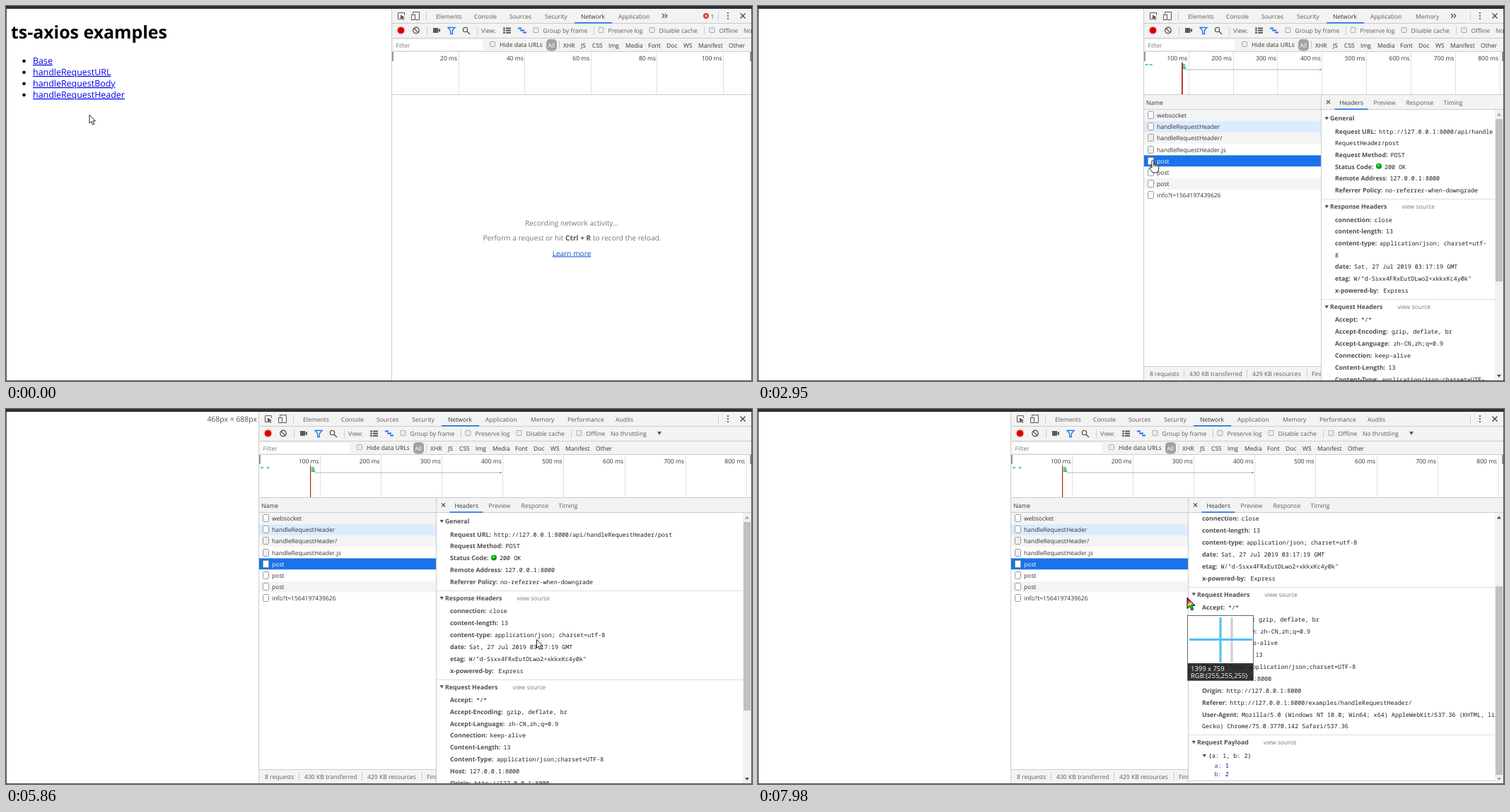
Animation of 1055x531 px, one loop 8 s. Source, as an HTML page:

```html
<!DOCTYPE html>
<html lang="en">
<head>
<meta charset="utf-8">
<title>Network panel demo</title>
<style>
  html, body { margin: 0; width: 100%; height: 100%; overflow: hidden; background: #fff; }
  svg { display: block; }
  #stage { width: 1055px; height: 531px; }
  text { font: 8.55px "Open Sans", "Noto Sans", sans-serif; fill: #333; text-rendering: geometricPrecision; white-space: pre; }
  .b { font-weight: 700; fill: #505050; font-size: 8.8px; }
  .m { font: 8.42px "Noto Sans Mono", "DejaVu Sans Mono", monospace; fill: #222; }
  .g { fill: #777; }
  .t { fill: #5a5a5a; }
  .u { text-decoration: underline; }
  .w { fill: #fff; }
  .e { text-anchor: end; }
  .c { text-anchor: middle; font-size: 10.15px; fill: #777; }
  .link { font-size: 12.45px; fill: #00e; text-decoration: underline; }
  .h1 { font-size: 24.9px; font-weight: 700; fill: #000; }
  .lens { font-size: 9.45px; fill: #fff; }
  .size { font-size: 10.46px; fill: #555; text-anchor: end; }
  .url { font-size: 9.3px; fill: #d0d0d0; }
</style>
</head>
<body>
<svg id="stage" viewBox="0 0 1055 531" xmlns="http://www.w3.org/2000/svg"></svg>
<script>
const LOOP = 8000;
const ROW = 16.1;
const stage = document.getElementById('stage');

// time, kind, x, y
const POINTER = [
  [0, 'arrow', 117.5, 153.5], [250, 'arrow', 119, 149], [380, 'arrow', 121, 142],
  [510, 'arrow', 123, 135], [640, 'hand', 125, 129], [760, 'hand', 126.5, 126],
  [1600, 'arrow', 190, 143], [1730, 'arrow', 362, 180], [1860, 'arrow', 510, 209],
  [2000, 'hand', 558.5, 218], [3350, 'hand', 568, 221], [3500, 'hand', 560, 226],
  [3650, 'hand', 549, 230], [4360, 'resize', 547, 234], [4890, 'resize', 500, 233],
  [5010, 'resize', 408, 232], [5160, 'resize', 359, 231], [5450, 'arrow', 400, 236],
  [5580, 'arrow', 510, 262], [5720, 'arrow', 655, 300], [5860, 'arrow', 750, 326],
  [6010, 'arrow', 776, 333], [7120, 'arrow', 768, 330], [7260, 'arrow', 738, 318],
  [7410, 'arrow', 700, 303], [7550, 'arrow', 664, 289], [7690, 'arrow', 638, 279],
  [7840, 'pick', 616, 271], [7980, 'pick', 607, 267]
];
const DOCK = [[0, 546], [4890, 500], [5010, 408], [5160, 358]];
const SCROLL = [[0, 0], [6150, 40], [6290, 78], [6430, 112], [6570, 131]];
const TIP = [[0, 0], [2150, .12], [2270, .3], [2390, .65], [2540, 1], [2820, 0]];

// label, left, right
const TABS = [['Elements', 62, 99], ['Console', 116, 149], ['Sources', 166, 198], ['Security', 216, 249],
  ['Network', 267, 302], ['Application', 320, 366], ['Memory', 384, 418], ['Performance', 436, 487], ['Audits', 504, 530]];
const TYPES = [['XHR', 242], ['JS', 267], ['CSS', 283], ['Img', 306], ['Media', 330], ['Font', 362],
  ['Doc', 388], ['WS', 412], ['Manifest', 433], ['Other', 476]];
const CHECKS = [['Group by frame', 200], ['Preserve log', 292], ['Disable cache', 364], ['Offline', 449]];

const PAGE = 'handleRequestHeader';
const REQS = [
  ['websocket', '101', 'webso...', 'sockjs.js:1683', '0 B'],
  [PAGE, '301', 'text/h...', 'Other', '299 B'],
  [PAGE + '/', '200', 'docu...', ':8000/exam...', '500 B'],
  [PAGE + '.js', '200', 'script', '(index)', '428 KB'],
  ['post', '200', 'xhr', 'xhr.ts:13', '219 B'],
  ['post', '200', 'xhr', 'xhr.ts:13', '219 B'],
  ['post', '200', 'xhr', 'xhr.ts:13', '250 B'],
  ['info?t=1564197439626', '200', 'xhr', 'sockjs.js:1605', '427 B']
];
const HOST = '127.0.0.1:8000';
const API = `http://${HOST}/api/${PAGE}/post`;

// label, value offset, value
const SECTIONS = [
  ['General', 0, [['Request URL', 81.5, API], ['Request Method', 98, 'POST'], ['Status Code', 89.5, '200 OK'],
    ['Remote Address', 97, HOST], ['Referrer Policy', 90.5, 'no-referrer-when-downgrade']]],
  ['Response Headers', 114, [['connection', 75, 'close'], ['content-length', 91.5, '13'],
    ['content-type', 82.5, 'application/json; charset=utf-8'], ['date', 46.5, 'Sat, 27 Jul 2019 03:17:19 GMT'],
    ['etag', 46, 'W/"d-Ssxx4FRxEutDLwo2+xkkxKc4y0k"'], ['x-powered-by', 88, 'Express']]],
  ['Request Headers', 108, [['Accept', 56.5, '*/*'], ['Accept-Encoding', 99.5, 'gzip, deflate, br'],
    ['Accept-Language', 102, 'zh-CN,zh;q=0.9'], ['Connection', 76, 'keep-alive'], ['Content-Length', 95, '13'],
    ['Content-Type', 85.5, 'application/json;charset=UTF-8'], ['Host', 47, HOST], ['Origin', 54, 'http://' + HOST],
    ['Referer', 59, `http://${HOST}/examples/${PAGE}/`],
    ['User-Agent', 75.5, 'Mozilla/5.0 (Windows NT 10.0; Win64; x64) AppleWebKit/537.36 (KHTML, like Gecko) Chrome/75.0.3770.142 Safari/537.36']]],
  ['Request Payload', 106.5, []]
];

const at = (table, t) => table.filter(row => row[0] <= t).pop();
const rect = (x, y, w, h, fill, more = '') => `<rect x="${x}" y="${y}" width="${w}" height="${h}" fill="${fill}" ${more}/>`;
const path = (d, fill, stroke = 'none', more = '') => `<path d="${d}" fill="${fill}" stroke="${stroke}" ${more}/>`;
const dot = (x, y, r, fill, more = '') => `<circle cx="${x}" cy="${y}" r="${r}" fill="${fill}" ${more}/>`;
// y is the middle of the line
const text = (x, y, s, cls = '') => `<text x="${x}" y="${y + 3}" class="${cls}">${s}</text>`;
const vline = (x, y, h, fill = '#ccc') => rect(x, y, 1, h, fill);
const clip = (x, y, w, h, body) => `<svg x="${x}" y="${y}" width="${w}" height="${h}" viewBox="${x} ${y} ${w} ${h}">${body}</svg>`;
const move = (x, y, body) => `<g transform="translate(${x} ${y})">${body}</g>`;
const check = (x, y) => rect(x + .5, y + .5, 7, 7, '#eee', 'rx="1" stroke="#aaa"');

function page() {
  const links = ['Base', 'handleRequestURL', 'handleRequestBody', PAGE];
  return text(7, 43, 'ts-axios examples', 'h1') +
    links.map((s, i) => dot(25.5, 78 + 16 * i, 2.3, '#000') + text(38, 79 + 16 * i, s, 'link')).join('');
}

function tabBar(d, net) {
  const room = net ? 975 : 930;
  const shown = TABS.filter(tab => d + tab[2] < room);
  let s = rect(d, 4, 1055 - d, 20, '#f3f3f3') + rect(d, 24, 1055 - d, 1, '#ccc');
  s += move(d, 0, path('M13 18.5H8.5V9.5H17.5V13', 'none', '#5a5a5a') + path('M12 12.5V19.5L14 17.8L16 20L17.3 19L15.5 16.6L18 16Z', '#5a5a5a') +
    path('M29.5 11.5V8.5H38.5V19.5H33.5', 'none', '#5a5a5a') + rect(27.5, 12.5, 5, 7, '#f3f3f3', 'stroke="#5a5a5a"') + vline(48, 8, 12));
  s += shown.map(([name, x]) => text(d + x, 14.5, name, name == 'Network' ? '' : 't')).join('');
  s += rect(d + 258, 23, 53, 1.6, '#1a73e8');
  if (shown.length < TABS.length) {
    const x = d + shown[shown.length - 1][2] + 16;
    s += path(`M${x} 11l3 3l-3 3M${x + 4} 11l3 3l-3 3`, 'none', '#444', 'stroke-width="1.1"');
  }
  if (!net) s += dot(990, 14, 4, '#d93a3a') + path('M988.5 12.5l3 3m0 -3l-3 3', 'none', '#fff') + text(996.5, 14.5, '1', 't');
  s += vline(1007, 8, 12) + [10, 14, 18].map(y => dot(1021, y, 1.1, '#444')).join('');
  return s + path('M1038.5 10.5l7 7m0 -7l-7 7', 'none', '#444', 'stroke-width="1.3"');
}

function toolBar() {
  let s = rect(0, 25, 800, 20, '#f3f3f3') + rect(0, 45, 800, 1, '#ccc');
  s += dot(12.5, 34.5, 6, '#f3b5b5') + dot(12.5, 34.5, 4.6, '#d80000');
  s += dot(34, 34.5, 4.2, 'none', 'stroke="#5a5a5a" stroke-width="1.4"') + path('M31 31.5l6 6', 'none', '#5a5a5a', 'stroke-width="1.3"');
  s += [49, 120, 285, 441].map(x => vline(x, 29, 12)).join('');
  s += rect(58, 31, 7, 7, '#5a5a5a') + path('M65 34l3 -2.5v6l-3 -2.5z', '#5a5a5a');
  s += path('M79 30.5H89L85.3 34.7V39.5H82.7V34.7Z', 'none', '#1a73e8', 'stroke-width="1.3"');
  s += dot(103.5, 33.5, 3.2, 'none', 'stroke="#5a5a5a" stroke-width="1.3"') + path('M106 36l4 4', 'none', '#5a5a5a', 'stroke-width="1.4"');
  s += text(126, 34.5, 'View:', 't');
  for (const y of [30.5, 33.7, 36.9]) s += rect(157, y, 3, 2, '#5a5a5a') + rect(161, y, 7, 2, '#5a5a5a');
  s += rect(178, 30.5, 5, 2, '#1a73e8') + rect(181, 33.5, 6, 2, '#1a73e8') + rect(185, 36.5, 5, 2, '#1a73e8');
  s += CHECKS.map(([name, x]) => check(x - .5, 30) + text(x + 13.5, 34.5, name, 't')).join('');
  s += text(497, 34.5, 'No throttling', 't') + path('M563 32h6l-3 5z', '#5a5a5a');
  // filter row
  s += rect(0, 46, 800, 18, '#f3f3f3') + rect(0, 64, 800, 1, '#ccc') + rect(2, 48, 126, 14, '#fff') + text(5.5, 55.5, 'Filter', 'g');
  s += check(138, 50) + text(152, 55, 'Hide data URLs') + rect(218, 47, 15, 16.5, '#a2a2a2', 'rx="5"') + text(220.5, 55.5, 'All', 'w') + vline(236, 49, 12);
  return s + TYPES.map(([name, x]) => text(x, 55.5, name)).join('');
}

function overview(d, net) {
  const w = 1054 - d, u = f => d + f * w;
  const pitch = net < 2 ? w * .1843 : w / 8.085;
  let s = rect(d, 65, w, 60, '#fff');
  for (let i = 1; i * pitch < w; i++) {
    const x = d + i * pitch;
    s += vline(Math.round(x), 65, 60, '#e0e0e0') + text(x - 1.5, 74, i * (net < 2 ? 20 : 100) + ' ms', 'e');
  }
  if (net == 1) {
    s += rect(549, 82.5, 14, 1, '#9dbb9d') + rect(563, 82.5, 10, 1.3, '#13b35e') + rect(600, 82.5, 5, 1, '#bbb') +
      rect(604, 82.5, 8, 1.3, '#13b35e') + rect(612, 82.5, 8, 1.3, '#14a8c4');
    [[933, 961], [935, 966], [938, 971]].forEach(([a, b], i) => {
      s += rect(a, 82.3 + 2.5 * i, 4, 1.5, '#d9a56a') + rect(a + 4, 82.3 + 2.5 * i, b - a - 4, 1.7, '#0dbb55');
    });
    s += vline(936, 80, 45, '#c0392b') + vline(938, 80, 45, '#3b78c8');
  }
  if (net == 2) {
    s += rect(u(.003), 82.5, 4, 1.3, '#1fa88e') + rect(u(.015), 82.5, 4, 1.3, '#1fa88e');
    s += [0, 1, 2].map(i => rect(u(.106), 82.5 + 2.4 * i, 4 + i * .7, 1.6, '#13a973')).join('');
    s += rect(u(.112), 89.6, w * .38, 1, '#a9bfb4') + rect(u(.489), 89.4, 2, 1.5, '#1497a8');
    s += rect(Math.round(u(.1035)), 80, d > 450 ? 1.8 : 1.2, 45, '#b3261e');
  }
  s += rect(d, 65, 2, 13, '#999') + rect(1052, 65, 2, 13, '#999');
  return s + rect(d, 125, w, 1, '#ccc');
}

function waterfall(net) {
  const base = 147;
  let s = '';
  const bar = (row, x, w, fill) => s += rect(x, base + 3 + ROW * row, w, 10, fill);
  if (net == 1) {
    s += vline(978, base, 363, '#e4e4e4') + vline(1029, base, 363, '#a83232') + vline(1030, base, 363, '#5a86c8');
    [[907, 3, 1], [911, 2, 1], [923, 4, 3], [1029, 7, 1.5], [1031, 6, 2], [1031, 8, 2]].forEach(([x, g, b], i) => {
      bar(i, x, g, '#0ec05a');
      bar(i, x + g, b, '#12a5e0');
    });
    for (const i of [3, 4, 5]) s += rect(1028, base + 6 + ROW * i, 2, 4, '#d9a56a');
  } else {
    s += vline(1010, base, 363, '#e4e4e4') + vline(922.5, base, 363, '#8a5a6a') + vline(923.3, base, 363, '#4a5a9a');
    [905, 906, 908, 923.3, 923.3, 923.6].forEach((x, i) => bar(i + 1, x, i == 2 ? 2 : 1.7, '#12a0e0'));
    bar(7, 988.2, 1.8, '#14aecb');
  }
  return s;
}

function requests(d, net, open) {
  const right = open ? Math.round(d + 250.5) : 1054, w = right - d;
  const list = net == 1 ? REQS.slice(1) : REQS;
  let s = rect(d, 126, w, 20, '#f3f3f3') + rect(d, 146, w, 1, '#ccc') + text(d + 3, 136.5, 'Name');
  list.forEach((r, i) => {
    const y = 147 + ROW * i, mid = y + 8.2, picked = open && i == 4;
    const cls = picked ? 'w' : '';
    s += rect(d, y, w, ROW, picked ? '#1a73e8' : r[1] == '301' ? '#dbecfd' : i % 2 ? '#fff' : '#f4f4f4');
    s += rect(d + 5.5, Math.round(mid) - 5.5, 8, 10, /\/$|js$/.test(r[0]) ? '#eee' : '#fff', 'rx="1" stroke="#9a9a9a"');
    s += text(d + 18, mid, r[0], cls);
    if (open) return;
    const wait = net == 1 && i == 6;
    s += text(705, mid, wait ? '(pendi...' : r[1], wait ? 'g' : '') + text(745, mid, r[2]);
    s += text(785, mid, r[3], r[3] == 'Other' ? 'g' : 'u') + text(882, mid, wait ? '0 B' : r[4], 'e') + text(890, mid, '...', 'g');
  });
  if (!open) {
    s += [['Status', 705], ['Type', 745], ['Initiator', 785], ['Size', 850], ['...', 889], ['Waterfall', 905]].map(([h, x]) => text(x, 136.5, h)).join('');
    s += [701, 741, 781, 846, 885, 901].map(x => vline(x, 126, 384, '#d0d0d0')).join('');
    s += path('M1040 138.5h7l-3.5 -5z', '#5a5a5a') + waterfall(net);
  }
  // summary
  s += rect(d, 510, w, 20, '#f3f3f3') + rect(d, 510, w, 1, '#ccc');
  s += [56, 145, 230].map(x => vline(d + x, 515, 11)).join('');
  const k = net == 1 ? 0 : 5;
  s += text(d + 8, 520.5, list.length + ' requests', 't') + text(d + 64, 520.5, '430 KB transferred', 't') +
    text(d + 153, 520.5, '429 KB resources', 't') + text(d + 237, 520.5, `Finish: ${net == 1 ? 87 : 391} ms`, 't');
  if (!open) {
    s += vline(843 + k, 515, 11) + vline(970 + k, 515, 11);
    s += text(850 + k, 520.5, '<tspan fill="#1463d2">DOMContentLoaded: 80 ms</tspan>') +
      text(977 + k, 520.5, '<tspan fill="#c5221f">Load: 80 ms</tspan>');
  }
  return clip(d, 126, w, 404, s);
}

function headers(p, wide) {
  const x = p + 19.5, step = 16.87;
  const fold = (x0, v, name) => {
    if (name == 'User-Agent') return v.indexOf('Gecko');
    if (/^content-type$/i.test(name)) return wide ? v.length : v.length - 1;
    return name == 'Request URL' ? Math.floor((1041 - x0) / 5.06) : v.length;
  };
  const tri = (a, y) => path(`M${a} ${y - 2}h5.5l-2.75 4.5z`, '#5a5a5a');
  let y = 159, s = '';
  SECTIONS.forEach(([title, src, lines], i) => {
    if (i) s += rect(p, Math.round(y - 10.8), 440, 1, '#ddd');
    s += tri(p + 5, y) + text(p + 12.5, y + .3, title, 'b');
    if (src) s += text(p + src, y + .3, 'view source', 'g');
    y += 18.2;
    for (const [name, dx, v] of lines) {
      const n = fold(p + dx, v, name);
      s += text(x, y + .3, name + ':', 'b') + text(p + dx, y + .3, v.slice(0, n), 'm');
      if (name == 'Status Code') s += dot(p + 81.5, y - .5, 4, '#0b9a0b') + dot(p + 81, y - 1.5, 2, '#4fd84f');
      if (n < v.length) s += text(x, (y += 16.3) + .3, v.slice(n), 'm');
      y += step;
    }
    y += 6.2;
  });
  y -= 5.3;
  s += tri(p + 20, y) + text(p + 28.5, y, '{a: 1, b: 2}', 'm');
  ['a', 'b'].forEach((k, i) => {
    const mid = y + 14 + 12 * i;
    s += text(p + 37, mid, `<tspan fill="#881391">${k}:</tspan> <tspan fill="#1c00cf">${i + 1}</tspan>`, 'm');
  });
  return s + rect(p, 657, 440, 1, '#ccc');
}

function details(d, scroll) {
  const p = d + 250.5, left = Math.round(p), w = 1054 - left, wide = d < 520;
  let s = rect(left, 126, w, 404, '#fff');
  s += clip(left, 147, 1042 - left, 383, move(0, -scroll, headers(p, wide)));
  s += rect(left, 126, w, 20, '#f3f3f3') + rect(left, 146, w, 1, '#ccc');
  s += path(`M${p + 7.5} 133.5l5 5m0 -5l-5 5`, 'none', '#5a5a5a', 'stroke-width="1.2"');
  s += [['Headers', 26], ['Preview', 74], ['Response', 120], ['Timing', 173]].map(([n, x], i) => text(p + x, 136.8, n, i ? 't' : '')).join('');
  s += rect(p + 19, 145.3, 47, 1.6, '#1a73e8');
  const size = d > 520 ? 230 : d > 436 ? 255 : 267;
  s += rect(1042, 147, 12, 383, '#f1f1f1') + rect(1043, 160 + scroll * .695, 10, size, '#c1c1c1');
  s += path('M1045 155.5h6l-3 -4z', scroll ? '#505050' : '#a3a3a3') + path('M1045 522h6l-3 4z', scroll > 130 ? '#a3a3a3' : '#505050');
  return s + vline(left - 1, 126, 404);
}

function idle() {
  return text(800, 307.5, 'Recording network activity...', 'c') +
    text(800.5, 329, 'Perform a request or hit <tspan font-weight="700" fill="#555">Ctrl + R</tspan> to record the reload.', 'c') +
    text(800, 350.5, '<tspan fill="#1155cc" text-decoration="underline">Learn more</tspan>', 'c');
}

const HUES = ['#f01030', '#f020c0', '#f8e010', '#20d030', '#10c8f0'];
const SHAPES = {
  arrow: path('M.5 .5V12.5L3.2 10L5.2 14.5L7.2 13.6L5.3 9.3H9Z', '#fff', '#222'),
  hand: path('M-1.6 11V1.8Q-1.6 .4 -.2 .4T1.2 1.8V6.4L6.6 7.3Q8.2 7.7 8.2 9.2V13L6.6 18H-.4L-4.4 12.6Q-4.8 10.6 -3.4 10.2Z', '#fff', '#222') +
    path('M1.2 6.4V10M3.7 7V10M6 7.4V10', 'none', '#222', 'stroke-width=".8"'),
  resize: path('M-8.5 0L-4 -4V-1.3H4V-4L8.5 0L4 4V1.3H-4V4Z', '#fff', '#222'),
  pick: `<linearGradient id="hue" x1="0" y1="0" x2=".3" y2="1">${HUES.map((c, i) =>
    `<stop offset="${.15 + i * .2}" stop-color="${c}"/>`).join('')}</linearGradient>` +
    path('M0 0V15.5L3.6 12.4L6.2 18L8.8 16.8L6.4 11.3H11Z', 'url(#hue)', '#000')
};
function pointer([, kind, x, y]) {
  return move(x, y, SHAPES[kind] + (kind == 'pick' ? lens(x, y) : ''));
}

function lens(x, y) {
  const sx = Math.round(x * 1.307 + 606), sy = Math.round(y * 1.307 + 410);
  let s = rect(1, 26, 92, 67, '#fff');
  if (x < 610) s += rect(61.5, 28, 3, 64, '#ccc');
  s += rect(45.5, 28, 3, 64, '#4cc0f6') + rect(3, 58, 89, 3, '#4cc0f6');
  s += rect(1, 93, 92, 24, '#1c1c1c', 'opacity=".9"') + rect(.5, 25.5, 93, 92, 'none', 'stroke="#666"');
  return s + text(5, 101, `${sx} x ${sy}`, 'lens') + text(5, 110.5, 'RGB:(255,255,255)', 'lens');
}

function tooltip(alpha) {
  return `<g opacity="${alpha}">${rect(561.5, 227.5, 222, 13, '#fff', 'stroke="#aaa"')}${text(566, 234, API, 't')}</g>`;
}

function scene(t) {
  const net = t < 1040 ? 0 : t < 1460 ? 1 : 2, open = t >= 2820;
  const d = at(DOCK, t)[1], tip = at(TIP, t)[1];
  let s = rect(0, 0, 1055, 531, '#fff');
  if (!net) s += page();
  s += tabBar(d, net) + clip(d, 25, 1054 - d, 40, move(d, 0, toolBar())) + overview(d, net);
  s += net ? requests(d, net, open) : idle();
  if (open) s += details(d, at(SCROLL, t)[1]);
  s += vline(d - 1, 4, 526);
  if (t >= 4890 && t < 6010) s += text(d - 3, 15, `${Math.round(d * 1.307)}px × 688px`, 'size');
  s += rect(0, 0, 1055, 4, '#2f2f38') + vline(0, 4, 527, '#55555c') + vline(1054, 4, 527, '#55555c') + rect(0, 530, 1055, 1, '#55555c');
  if (t >= 640 && t < 1600)
    s += path('M0 514H178Q181 514 181 517V531H0Z', '#56565a') + text(3, 523, `${HOST}/.../${PAGE}`, 'url');
  if (tip) s += tooltip(tip);
  return s + pointer(at(POINTER, t));
}

let shown = '';
function draw(now) {
  const next = scene(now % LOOP);
  if (next !== shown) stage.innerHTML = shown = next;
}
const start = performance.now();
function tick() {
  draw(performance.now() - start);
  requestAnimationFrame(tick);
}
tick();
</script>
</body>
</html>
```
